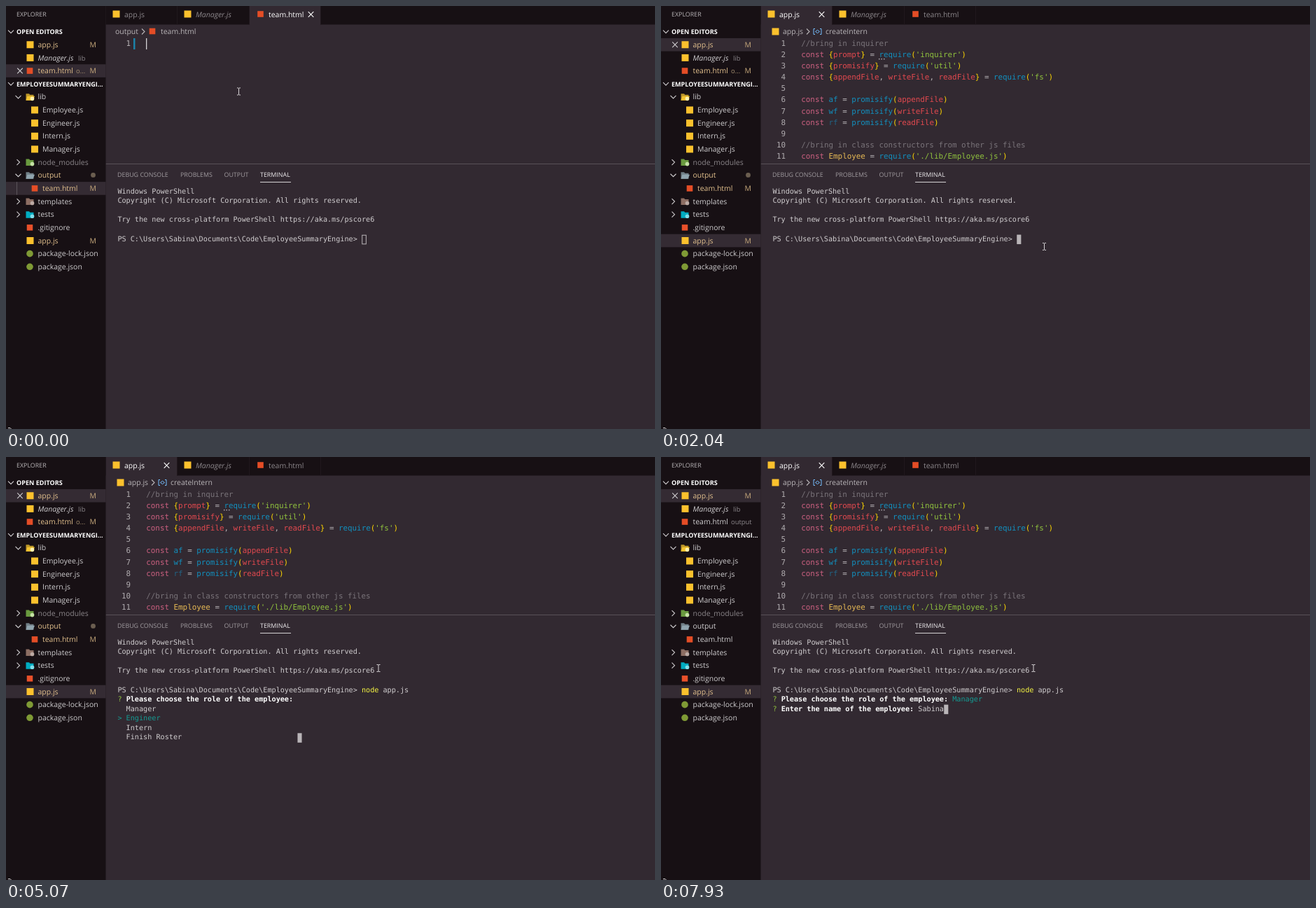
An HTML page that plays this animation: 927 by 604 pixels, repeating every 8 s.

```html
<!DOCTYPE html>
<html lang="en">
<head>
<meta charset="utf-8">
<title>Employee roster prompt</title>
<style>
html, body { margin: 0; width: 100%; height: 100%; overflow: hidden; background: #322931; }
svg { display: block; width: 100vw; height: 100vh; }
text { white-space: pre; text-rendering: geometricPrecision; }
.ui { font: 10.48px "Open Sans", "Noto Sans", sans-serif; }
.small { font-size: 9.4px; }
.caps { font-size: 8.9px; }
.head { font-size: 9.05px; font-weight: 700; }
.code { font: 10.866px "DejaVu Sans Mono", monospace; }
.term { font: 10.165px "DejaVu Sans Mono", monospace; }
.it { font-style: italic; }
.b { font-weight: 700; }
</style>
</head>
<body>
<svg id="stage" viewBox="0 0 927 604"></svg>
<script>
const LOOP = 8000;
const stage = document.getElementById('stage');
const C = {
  bg: '#322931', dark: '#171014', row: '#342b33', fg: '#b9b5b8', side: '#cfcdcf', white: '#ffffff', out: '#d0cdcf',
  dim: '#8c878b', comment: '#797379', red: '#e2494f', green: '#8fc13e', blue: '#1290bf', teal: '#149b93',
  pink: '#cc6080', gold: '#e6b955', brace: '#ffd700', mod: '#e2c08d', js: '#fbc12d', html: '#e44d26', json: '#7f9a35'
};

// Basic shapes
const rect = (x, y, w, h, fill, extra = '') =>
  `<rect x="${x}" y="${y}" width="${w}" height="${h}" fill="${fill}" ${extra}/>`;
const dot = (x, y, r, fill) => `<circle cx="${x}" cy="${y}" r="${r}" fill="${fill}"/>`;
const line = (d, color, w = 1) => `<path d="${d}" fill="none" stroke="${color}" stroke-width="${w}"/>`;
const text = (x, y, s, fill, cls = 'ui', extra = '') =>
  `<text x="${x}" y="${y}" fill="${fill}" class="${cls}" ${extra}>${s}</text>`;
const span = (s, fill, cls = '') => `<tspan fill="${fill}" class="${cls}">${s}</tspan>`;
const esc = s => s.replace(/&/g, '&amp;').replace(/</g, '&lt;').replace(/>/g, '&gt;');

// Icons, placed by centre
const block = (x, y, fill, s = 10) => rect(x - s / 2, y - s / 2, s, s, fill);
const jsIcon = (x, y) => block(x, y, C.js);
const htmlIcon = (x, y) => block(x, y, C.html, 8.6);
const cross = (x, y, color) => line(`M${x - 3.8} ${y - 3.8}l7.6 7.6m0-7.6l-7.6 7.6`, color, 1.1);
const down = (x, y, color = C.side) => line(`M${x - 4} ${y - 2}l4 4l4-4`, color, 1.1);
const right = (x, y, color = C.side) => line(`M${x - 2} ${y - 4}l4 4l-4 4`, color, 1.1);
function folder(x, y, fill, badge, open) {
  const flap = open ? `<path d="M${x - 4} ${y - 1}h10.5l-2.5 6h-10z" fill="${fill}"/>` : '';
  const body = `<path d="M${x - 6} ${y - 4.5}h4.5l1.3 1.5h5.2v8h-11z" fill="${fill}" ${open ? 'opacity=".75"' : ''}/>`;
  return body + flap + (badge ? dot(x + 3, y + 2.5, 2.8, badge) : '');
}

const rowY = i => 36.6 + 18.65 * i;

function sidebar(t) {
  const first = t < 1210, dirty = t < 5270;
  let s = rect(0, 0, 142.5, 604, C.dark);
  const select = i => { s += rect(0, rowY(i) - 9.3, 142.5, 18.65, C.row); };
  const label = (i, x, name, color = C.side, cls = 'ui') => { s += text(x, rowY(i) + 3.6, name, color, cls); };
  const modified = i => label(i, 119.5, 'M', '#c6a87b');

  select(first ? 3 : 1);
  select(first ? 12 : 16);
  s += text(15, 15.3, 'EXPLORER', C.fg, 'ui caps');
  s += down(7, rowY(0)) + down(7, rowY(4));
  label(0, 15, 'OPEN EDITORS', C.white, 'ui head');
  label(4, 15, 'EMPLOYEESUMMARYENGI...', C.white, 'ui head');
  s += cross(20, rowY(first ? 3 : 1), C.side);

  s += jsIcon(34.5, rowY(1)) + jsIcon(34.5, rowY(2)) + htmlIcon(34, rowY(3));
  label(1, 45.5, 'app.js', C.mod);
  modified(1);
  label(2, 45.5, 'Manager.js', C.side, 'ui it');
  label(2, 103, 'lib', C.dim, 'ui small');
  label(3, 45.5, 'team.html', dirty ? C.mod : C.side);
  label(3, 100, dirty ? 'o...' : 'output', dirty ? '#a58f70' : C.dim, 'ui small');
  if (dirty) modified(3);

  s += down(17.5, rowY(5)) + folder(34.5, rowY(5), '#f4c430', '#fff3b0', true);
  label(5, 45.5, 'lib');
  ['Employee', 'Engineer', 'Intern', 'Manager'].forEach((name, k) => {
    s += jsIcon(41, rowY(6 + k));
    label(6 + k, 52, name + '.js');
  });
  s += right(17.5, rowY(10)) + folder(34.5, rowY(10), '#6a9a3f', '#c5e1a5');
  label(10, 45.5, 'node_modules', C.dim);
  s += down(17.5, rowY(11)) + folder(34.5, rowY(11), '#90a4ae', '', true);
  label(11, 45.5, 'output', dirty ? C.mod : C.side);
  if (dirty) s += dot(124.5, rowY(11) - 0.3, 3.4, '#6b5e50');
  s += htmlIcon(41, rowY(12));
  label(12, 52, 'team.html', dirty ? C.mod : C.side);
  if (dirty) modified(12);
  if (first) s += rect(15, rowY(12) - 9.3, 1, 18.6, '#5c545b');
  s += right(17.5, rowY(13)) + folder(34.5, rowY(13), '#8d6e63', '#bcaaa4');
  label(13, 45.5, 'templates');
  s += right(17.5, rowY(14)) + folder(34.5, rowY(14), '#00acc1', '#80deea');
  label(14, 45.5, 'tests');
  s += block(34, rowY(15), '#e8502a', 8.5);
  label(15, 45.5, '.gitignore');
  s += jsIcon(34.5, rowY(16));
  label(16, 45.5, 'app.js', C.mod);
  modified(16);
  s += dot(34, rowY(17), 4.8, C.json) + dot(34, rowY(18), 4.8, C.json);
  label(17, 45.5, 'package-lock.json');
  label(18, 45.5, 'package.json');
  return s + line('M3 602.5h3l1.5 1.5', '#e0dde0');
}

function tabs(t) {
  const first = t < 1210;
  let s = rect(142.5, 0, 784.5, 26.5, C.dark);
  s += first ? rect(347.5, 0, 101.5, 27, C.bg) : rect(143, 0, 101, 27, C.bg);
  for (const x of [244, 347, 449]) s += rect(x, 0, 1, 26.5, '#20181d');
  s += jsIcon(157.5, 11.5) + jsIcon(259.5, 11.5) + htmlIcon(363.5, 11.5);
  s += text(169, 16.4, 'app.js', first ? C.dim : C.white);
  s += text(271, 16.4, 'Manager.js', C.dim, 'ui it');
  s += text(375, 16.4, 'team.html', first ? C.white : C.dim);
  if (first) s += cross(435.5, 12, C.white);
  if (t >= 810) s += cross(229.5, 12, first ? C.fg : C.white);
  return s;
}

const source = [
  '//bring in inquirer',
  "const {prompt} = require('inquirer')",
  "const {promisify} = require('util')",
  "const {appendFile, writeFile, readFile} = require('fs')",
  '',
  'const af = promisify(appendFile)',
  'const wf = promisify(writeFile)',
  'const rf = promisify(readFile)',
  '',
  '//bring in class constructors from other js files',
  "const Employee = require('./lib/Employee.js')"
];

function hue(word, next) {
  if (word.startsWith('//')) return C.comment;
  if (word[0] === "'") return C.green;
  if (word === 'const') return C.pink;
  if (/[{}()]/.test(word)) return C.brace;
  if (word === 'Employee') return C.gold;
  if (word === 'rf') return '#216486';
  if (/\w/.test(word)) return /[,})]/.test(next) ? C.red : C.blue;
  return C.fg;
}

const paint = row => row.replace(/\/\/.*|'[^']*'|\w+|[{}()]|[^\w{}()']+/g,
  (word, at) => span(word, hue(word, row[at + word.length])));

function editor(t) {
  if (t < 1210) {
    let s = text(156, 40, 'output', C.fg) + right(196, 36.5, C.fg) + htmlIcon(209, 36);
    s += text(221, 40, 'team.html', t >= 590 && t < 810 ? C.white : C.fg);
    s += text(178, 57, '1', C.fg, 'code', 'text-anchor="end"') + rect(182, 46, 2.5, 16, '#1b81a8');
    if (t < 200 || t >= 590) s += rect(200, 46, 1.3, 16, '#d5d2d4');
    return s;
  }
  let s = jsIcon(163.5, 36.5) + text(174, 40, 'app.js', C.fg) + right(210, 36.5, C.fg);
  s += line('M220 32.5h-2v8h2M227 32.5h2v8h-2', '#75beff') + line('M220.5 36.5l3-2.2l3 2.2l-3 2.2z', '#75beff');
  s += text(235, 40, 'createIntern', t < 1410 ? C.white : C.fg);
  source.forEach((row, i) => {
    const y = 56.9 + 16.1 * i;
    s += text(178, y, i + 1, '#b0acaf', 'code', 'text-anchor="end"') + text(200.3, y, paint(row), C.fg, 'code');
  });
  for (let k = 0; k < 3; k++) s += rect(311 + 3.5 * k, 75, 1.4, 1.4, C.fg);
  return s;
}

// Terminal grid
const CELL = 6.12, LEFT = 159.4;
const PROMPT = 'PS C:\\Users\\Sabina\\Documents\\Code\\EmployeeSummaryEngine> ';
const ASK = 'Please choose the role of the employee: ';
const NAME = 'Enter the name of the employee: ';
const put = (r, s) => text(LEFT, 267.8 + 13.55 * r, s, C.out, 'term');
const question = s => span('? ', C.green) + span(s, C.white, 'b');

function cursor(col, r, focused = true) {
  const x = LEFT + col * CELL, y = 258.8 + 13.55 * r;
  return focused ? rect(x, y, 6.1, 13.5, C.fg)
    : rect(x + 0.5, y + 0.7, 5.6, 12.6, 'none', `stroke="${C.fg}"`);
}

function choices(t) {
  const picked = t < 5070 ? 0 : t < 5490 ? 1 : t < 5700 ? 2 : t < 6100 ? 1 : 0;
  const hint = t < 5070 ? '(Use arrow keys)' : '';
  let s = put(6, question(ASK) + hint);
  ['Manager', 'Engineer', 'Intern', 'Finish Roster'].forEach((role, i) => {
    s += put(7 + i, i === picked ? span('&gt; ' + role, C.teal) : '  ' + role);
  });
  return s + cursor(42 + hint.length, 10);
}

function terminal(t) {
  let s = rect(142.5, 225, 784.5, 1, '#595158');
  [['DEBUG CONSOLE', 159], ['PROBLEMS', 249], ['OUTPUT', 311.5], ['TERMINAL', 363]].forEach(([name, x], i) => {
    s += text(x, 243.6, name, i === 3 ? '#eeecee' : '#a09b9f', 'ui caps');
  });
  s += rect(363, 251, 44, 1, '#d5d2d4');
  s += put(0, 'Windows PowerShell') + put(1, 'Copyright (C) Microsoft Corporation. All rights reserved.');
  s += put(3, 'Try the new cross-platform PowerShell https://aka.ms/pscore6');
  s += put(5, esc(PROMPT) + (t < 2830 ? '' : span('node', '#f5f543') + ' app.js'));
  if (t < 2830) return s + cursor(57, 5, t >= 2040);
  if (t < 3440) return s + cursor(68, 5);
  if (t < 3840) return s + cursor(0, 6);
  if (t < 6700) return s + choices(t);
  const typed = 'Sabina'.slice(0, t < 7500 ? 0 : t < 7720 ? 1 : t < 7930 ? 5 : 6);
  s += put(6, question(ASK) + span('Manager', C.teal));
  return s + put(7, question(NAME) + typed) + cursor(2 + NAME.length + typed.length, 7);
}

// Pointer: start time, kind, hot spot
const path = [
  [0, 'beam', 332.5, 122], [200, 'beam', 329.5, 121.5], [390, 'beam', 288.8, 84.5],
  [590, 'hand', 250, 39], [810, 'hand', 208, 13.5], [1210, 'hand', 233.5, 40],
  [1410, 'arrow', 450, 233], [1630, 'beam', 504.5, 316.5], [1830, 'beam', 529.5, 331.5],
  [2040, 'beam', 547.5, 343.5], [2230, 'beam', 532, 301.5]
];
const shapes = {
  beam: line('M-2.5-5h1.7l.8.6l.8-.6h1.7M0-4.5v9M-2.5 5h1.7l.8-.6l.8.6h1.7', '#d8d5d7'),
  hand: '<path d="M-1.5 1q0-1.3 1.3-1.3t1.3 1.3v4.5q4 .4 5.6 1.8v3.6l-1.4 3.6h-5.6l-3.6-5.5q-.4-2 2.4-.8z" fill="#fff" stroke="#111" stroke-width=".8"/>',
  arrow: '<path d="M0 0v11.5l2.7-2.5l1.8 4l1.8-.8l-1.8-3.9h3.6z" fill="#fff" stroke="#111" stroke-width=".7"/>'
};

function pointer(t) {
  const [, kind, x, y] = path.filter(p => p[0] <= t).pop();
  const click = t >= 1020 && t < 1210 ? dot(207.8, 13.5, 10.2, '#b0a60c') : '';
  return click + `<g transform="translate(${x} ${y})">${shapes[kind]}</g>`;
}

let shown = '';
function draw(t) {
  const scene = rect(0, 0, 927, 604, C.bg) + editor(t) + terminal(t) + sidebar(t) + tabs(t) + pointer(t);
  if (scene !== shown) stage.innerHTML = shown = scene;
}

const start = performance.now();
function tick() {
  draw((performance.now() - start) % LOOP);
  requestAnimationFrame(tick);
}
tick();
</script>
</body>
</html>
```
